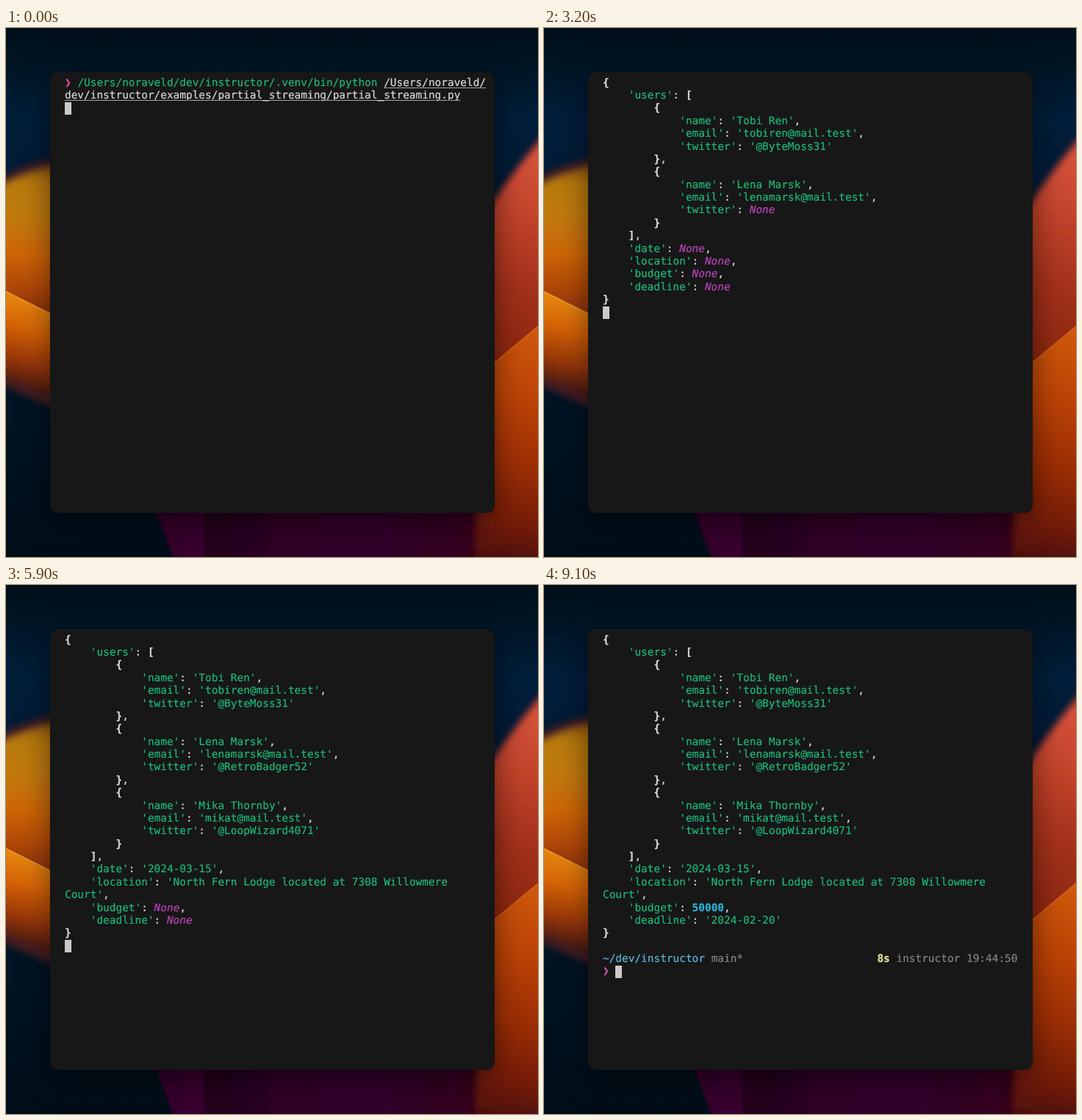
An HTML page for the animation above (9.2 s loop, 724 by 720 pixels).

```html
<!DOCTYPE html>
<html lang="en">
<head>
<meta charset="utf-8">
<title>Partial streaming</title>
<style>
html, body { margin: 0; width: 100%; height: 100%; overflow: hidden; background: #000f1c; }
#stage { position: absolute; left: 0; top: 0; width: 724px; height: 720px; overflow: hidden; }
#stage svg { position: absolute; left: 0; top: 0; }
#win {
  position: absolute; left: 59.5px; top: 60px; width: 605px; height: 600px;
  border-radius: 11px; background: #171717;
  box-shadow: 0 12px 40px rgba(0, 0, 0, .5), 0 0 1px rgba(0, 0, 0, .6);
}
#term {
  position: absolute; left: 80px; top: 66.7px; margin: 0; white-space: pre;
  font: 14.43px/17.37px "DejaVu Sans Mono", "Liberation Mono", monospace;
  color: #d9d9d9; text-rendering: geometricPrecision;
  -webkit-text-stroke: .2px currentColor;
}
#cursor { position: absolute; width: 8.7px; height: 17.4px; background: #cacaca; }
.str { color: #1cb97a; }
.none { color: #b844b8; font-style: italic; }
.num { color: #2bb3d6; font-weight: bold; }
.brace { font-weight: bold; }
.mark { color: #dc50b4; }
.dir { color: #5cb8dc; }
.dim { color: #858585; }
.took { color: #e6e59a; font-weight: bold; }
.file { text-decoration: underline 1px #a5a5a5; text-underline-offset: 2px; }
</style>
</head>
<body>
<div id="stage">
  <svg width="724" height="720" viewBox="0 0 724 720">
    <defs>
      <linearGradient id="sky" x2="0" y2="1">
        <stop offset="0" stop-color="#000f19"/><stop offset=".06" stop-color="#001422"/>
        <stop offset=".17" stop-color="#001e3a"/><stop offset=".3" stop-color="#001b36"/>
        <stop offset=".7" stop-color="#001424"/><stop offset="1" stop-color="#000e18"/>
      </linearGradient>
      <linearGradient id="leftTop" gradientUnits="userSpaceOnUse" x1="30" y1="184" x2="14" y2="390">
        <stop offset="0" stop-color="#95560f"/><stop offset=".14" stop-color="#b87a10"/>
        <stop offset=".35" stop-color="#c17a0b"/><stop offset=".6" stop-color="#cd6506"/>
        <stop offset=".82" stop-color="#b04708"/><stop offset="1" stop-color="#85300d"/>
      </linearGradient>
      <linearGradient id="leftLow" gradientUnits="userSpaceOnUse" x1="36" y1="372" x2="0" y2="492">
        <stop offset="0" stop-color="#e5860f"/><stop offset=".3" stop-color="#d66306"/>
        <stop offset=".65" stop-color="#983708"/><stop offset="1" stop-color="#32120c"/>
      </linearGradient>
      <linearGradient id="rightTop" gradientUnits="userSpaceOnUse" x1="722" y1="175" x2="675" y2="450">
        <stop offset="0" stop-color="#d5523a"/><stop offset=".3" stop-color="#c2432b"/>
        <stop offset=".65" stop-color="#a3311b"/><stop offset="1" stop-color="#8c270f"/>
      </linearGradient>
      <linearGradient id="rightLow" gradientUnits="userSpaceOnUse" x1="716" y1="415" x2="676" y2="725">
        <stop offset="0" stop-color="#cf570b"/><stop offset=".3" stop-color="#bb4206"/>
        <stop offset=".6" stop-color="#9a2d05"/><stop offset=".85" stop-color="#721b08"/>
        <stop offset="1" stop-color="#4c0f10"/>
      </linearGradient>
      <linearGradient id="plum" gradientUnits="userSpaceOnUse" x1="205" y1="0" x2="724" y2="0">
        <stop offset="0" stop-color="#35042c"/><stop offset=".12" stop-color="#38052e"/>
        <stop offset=".13" stop-color="#25031d"/><stop offset=".29" stop-color="#2a0423"/>
        <stop offset=".3" stop-color="#310528"/><stop offset=".6" stop-color="#30042a"/>
        <stop offset=".85" stop-color="#36061d"/><stop offset="1" stop-color="#521012"/>
      </linearGradient>
      <filter id="soft" x="-30%" y="-30%" width="160%" height="160%"><feGaussianBlur stdDeviation="5"/></filter>
      <filter id="fine"><feGaussianBlur stdDeviation="1"/></filter>
    </defs>
    <rect width="724" height="720" fill="url(#sky)"/>
    <path d="M203 655L229 725H740V655Z" fill="url(#plum)" filter="url(#fine)"/>
    <path d="M527 655Q526 695 515 722" fill="none" stroke="#4a0a3c" opacity=".5"/>
    <g filter="url(#soft)">
      <path d="M-20 210Q20 184 80 174V524L-20 480Z" fill="#421a22"/>
      <path d="M-20 224Q20 196 80 187V398L-20 348Z" fill="url(#leftTop)"/>
      <path d="M-20 360L80 404V506L-20 468Z" fill="url(#leftLow)"/>
      <path d="M745 128Q700 176 650 252V480H745Z" fill="#4c1c2a"/>
      <path d="M745 136Q700 182 650 261V480H745Z" fill="url(#rightTop)"/>
      <path d="M650 480H750V750H635Z" fill="url(#rightLow)"/>
    </g>
    <path d="M0 290V358L60 388V290Z" fill="url(#leftTop)"/>
    <path d="M0 358L60 388V455H0Z" fill="url(#leftLow)"/>
    <path d="M0 358.5L60 388.5" stroke="#efa640" stroke-width="1.2" opacity=".7"/>
    <path d="M664 300H724V406L664 456Z" fill="url(#rightTop)"/>
    <path d="M664 456L724 406V720H664Z" fill="url(#rightLow)"/>
    <path d="M664 456L724 406" stroke="#e57a24" stroke-width="1.2" opacity=".65"/>
  </svg>
  <div id="win"></div>
  <pre id="term"></pre>
  <div id="cursor"></div>
</div>
<script>
const LOOP = 9200, TICK = 100, TOKEN = 50, COLS = 66;
const CHAR = 8.69, ROW = 17.37;
const term = document.getElementById('term');
const cursor = document.getElementById('cursor');

const userTimes = [900, 2350, 3600];

// owner (user index or 'top'), key, start time, tokens
const fields = [
  [0, 'name', 1000, 'Tobi| Ren'],
  [0, 'email', 1540, 'tobi|r|en|@|mail|.test'],
  [0, 'twitter', 2000, '@|Byte|M|oss|31'],
  [1, 'name', 2500, 'Lena| Marsk'],
  [1, 'email', 2750, 'l|en|am|arsk|@|mail|.test'],
  [1, 'twitter', 3280, '@|Retro|B|adger|52'],
  [2, 'name', 3760, 'Mika| Thorn|by'],
  [2, 'email', 4050, 'mi|kat|@|mail|.test'],
  [2, 'twitter', 4450, '@|Loop|W|izard|40|71'],
  ['top', 'date', 4950, '2024|-|03|-|15'],
  ['top', 'location', 5330, 'North| Fern| Lodge| located| at| |730|8| Willow|mere| Court'],
  ['top', 'budget', 6100, 50000],
  ['top', 'deadline', 6350, '2024|-|02|-|20']
];

const span = (cls, text) => `<span class="${cls}">${text}</span>`;

function dataAt(t) {
  const users = userTimes.filter(s => t >= s)
    .map(() => ({ name: null, email: null, twitter: null }));
  const top = { users, date: null, location: null, budget: null, deadline: null };
  for (const [owner, key, start, value] of fields) {
    if (t < start) continue;
    const count = Math.floor((t - start) / TOKEN) + 1;
    const target = owner === 'top' ? top : users[owner];
    target[key] = typeof value === 'number' ? value : value.split('|').slice(0, count).join('');
  }
  return top;
}

const entries = v => Array.isArray(v)
  ? v.map(x => ['', x])
  : Object.entries(v).map(([k, x]) => [`'${k}': `, x]);
const ends = v => Array.isArray(v) ? '[]' : '{}';

function flat(v) {
  if (v === null) return 'None';
  if (typeof v === 'string') return `'${v}'`;
  if (typeof v === 'number') return String(v);
  return ends(v)[0] + entries(v).map(([k, x]) => k + flat(x)).join(', ') + ends(v)[1];
}

function wrap(line) {
  if (line.length <= COLS) return line;
  const cut = line.lastIndexOf(' ', COLS);
  return line.slice(0, cut) + '\n' + line.slice(cut + 1);
}

// Containers stay on one line when they fit, otherwise they open up.
function pretty(v, pad = '', lead = '', tail = '') {
  const line = pad + lead + flat(v) + tail;
  if (v === null || typeof v !== 'object') return wrap(line);
  if (line.length <= COLS) return line;
  const items = entries(v);
  const body = items.map(([k, x], i) =>
    pretty(x, pad + '    ', k, i < items.length - 1 ? ',' : ''));
  return [pad + lead + ends(v)[0], ...body, pad + ends(v)[1] + tail].join('\n');
}

const paint = text => text.replace(/('[^']*')|(None)|(\d+)|([{}[\]]+)/g,
  (m, str, none, num) => span(str ? 'str' : none ? 'none' : num ? 'num' : 'brace', m));

const home = '/Users/noraveld/';
const command = span('mark', '❯') + ' ' +
  span('str', home + 'dev/instructor/.venv/bin/python') + ' ' +
  span('file', home) + '\n' +
  span('file', 'dev/instructor/examples/partial_streaming/partial_streaming.py');

const prompt = '\n\n' + span('dir', '~/dev/instructor') + ' ' + span('dim', 'main*') +
  ' '.repeat(21) + span('took', '8s') + ' ' + span('dim', 'instructor 19:44:50') +
  '\n' + span('mark', '❯');

function screenAt(t) {
  if (t < 700) return [command, 2, 0];
  if (t >= 4100 && t < 4200) return ['', 0, 0];
  const text = pretty(dataAt(t));
  const rows = text.split('\n').length;
  return t < 6800 ? [paint(text), rows, 0] : [paint(text) + prompt, rows + 2, 2];
}

let last = -1;
function draw() {
  const t = Math.floor(performance.now() % LOOP / TICK) * TICK;
  if (t !== last) {
    const [html, row, col] = screenAt(t);
    term.innerHTML = html;
    cursor.style.left = 80 + col * CHAR + 'px';
    cursor.style.top = 66.2 + row * ROW + 'px';
    last = t;
  }
  requestAnimationFrame(draw);
}
draw();
</script>
</body>
</html>
```
